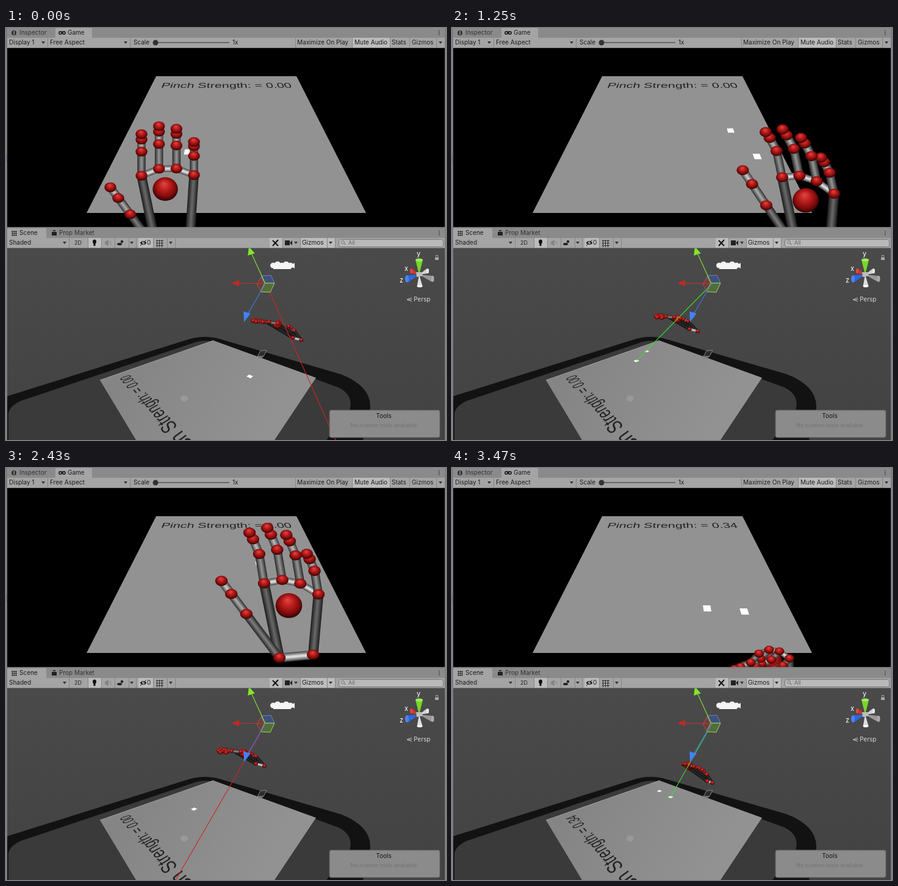
Animation, 721 px wide and 675 px high, one loop 3550 ms. Source, as an HTML page with a canvas:

```html
<!DOCTYPE html>
<html lang="en">
<head>
<meta charset="utf-8">
<title>Hand tracking editor</title>
<style>
html, body { margin: 0; width: 100%; height: 100%; overflow: hidden; background: #7d7d7d; }
canvas { display: block; }
</style>
</head>
<body>
<canvas id="stage" width="721" height="675"></canvas>
<script>
const ctx = document.getElementById('stage').getContext('2d');
const LOOP = 3550, STEPS = 45;
const mix = (a, b, t) => a.map((v, i) => v + (b[i] - v) * t);
const add = (a, b, k = 1) => [a[0] + b[0] * k, a[1] + b[1] * k];

// Drawing helpers
function rect(x, y, w, h, c) { ctx.fillStyle = c; ctx.fillRect(x, y, w, h); }
function poly(pts, fill, stroke) {
  ctx.beginPath();
  pts.forEach(p => ctx.lineTo(p[0], p[1]));
  ctx.closePath();
  if (fill) { ctx.fillStyle = fill; ctx.fill(); }
  if (stroke) { ctx.strokeStyle = stroke; ctx.lineWidth = 1; ctx.stroke(); }
}
function line(a, b, c, w = 1) {
  ctx.strokeStyle = c; ctx.lineWidth = w;
  ctx.beginPath(); ctx.moveTo(a[0], a[1]); ctx.lineTo(b[0], b[1]); ctx.stroke();
}
function oval(x, y, rx, ry, c) {
  ctx.fillStyle = c;
  ctx.beginPath(); ctx.ellipse(x, y, rx, ry, 0, 0, 7); ctx.fill();
}
function box(x, y, w, h, fill, stroke) {
  ctx.fillStyle = fill; ctx.strokeStyle = stroke; ctx.lineWidth = 1;
  ctx.beginPath(); ctx.roundRect(x, y, w, h, 3); ctx.fill(); ctx.stroke();
}
function label(s, x, y, c = '#1c1c1c', size = 10, align = 'left') {
  ctx.font = size + 'px Inter, sans-serif';
  ctx.textAlign = align; ctx.textBaseline = 'middle';
  ctx.fillStyle = c; ctx.fillText(s, x, y);
}
function caret(x, y) { poly([[x - 3, y - 2], [x + 3, y - 2], [x, y + 2]], '#333'); }
function view(x, y, w, h, draw) {
  ctx.save(); ctx.beginPath(); ctx.rect(x, y, w, h); ctx.clip();
  draw(); ctx.restore();
}

// Perspective map from the unit square to four corners, clockwise from top left
function quadMap([p0, p1, p2, p3]) {
  const [ax, ay] = add(p1, p2, -1), [bx, by] = add(p3, p2, -1);
  const [sx, sy] = add(add(p0, p1, -1), add(p2, p3, -1));
  const det = ax * by - bx * ay;
  const g = (sx * by - bx * sy) / det, h = (ax * sy - sx * ay) / det;
  return (u, v) => [0, 1].map(i =>
    ((p1[i] * (1 + g) - p0[i]) * u + (p3[i] * (1 + h) - p0[i]) * v + p0[i]) / (1 + g * u + h * v));
}
const GAME = [[246, 79], [476, 79], [590, 303], [132, 303]];
const toGame = quadMap(GAME);
const toScene = quadMap([[300, 820], [154, 577], [340, 512], [508, 573]]);
function fromGame([x, y]) {
  const w = 230 + (y - 79) * 228 / 224;
  return [(x - 361) / w + .5, (1 / 230 - 1 / w) / (1 / 230 - 1 / 458)];
}
function boardText(s, map) {
  const em = .0873 / 100, ev = .09 / 100, d = .002, v = .13;
  ctx.font = '100px "Liberation Sans", Arial, sans-serif';
  ctx.textAlign = 'center'; ctx.textBaseline = 'alphabetic'; ctx.fillStyle = '#222';
  let u = .068;
  for (const ch of s) {
    const w = ctx.measureText(ch).width * em, m = u + w / 2, p = map(m, v);
    const across = add(map(m + d, v), p, -1), down = add(map(m, v + d), p, -1);
    ctx.save();
    ctx.transform(across[0] / d * em, across[1] / d * em, down[0] / d * ev, down[1] / d * ev, ...p);
    ctx.fillText(ch, 0, 30);
    ctx.restore();
    u += w;
  }
}
function cursor([u, v], map) {
  const r = .016;
  poly([map(u - r, v - r), map(u + r, v - r), map(u + r, v + r), map(u - r, v + r)], '#fff');
}

// Key poses: index knuckle, span to the little finger, finger reach, thumb tip, pointer hit, second cursor
const KEYS = [
  { at: 0, knuckle: [222, 242], span: [86, -1], reach: [0, -68], thumb: [171, 261], hit: [132, 167], dot: [298, 203] },
  { at: 6, knuckle: [112, 248], span: [106, -9], reach: [8, -72], thumb: [50, 274], hit: [-10, 231], dot: [254, 180] },
  { at: 12, knuckle: [579, 236], span: [84, 31], reach: [-25, -74], thumb: [513, 217], hit: [492, 157], dot: [523, 206] },
  { at: 20, knuckle: [503, 253], span: [86, 23], reach: [-29, -74], thumb: [440, 249], hit: [421, 179], dot: [477, 215] },
  { at: 31, knuckle: [423, 189], span: [89, 18], reach: [-24, -83], thumb: [353, 185], hit: [301, 91], dot: [414, 156] },
  { at: 38, knuckle: [477, 230], span: [94, 19], reach: [-26, -83], thumb: [410, 222], hit: [368, 131], dot: [446, 178] },
  { at: 44, knuckle: [503, 304], span: [50, 8], reach: [-40, 25], thumb: [470, 345], hit: [418, 230], dot: [479, 235] }
];
function poseAt(step) {
  const k = Math.max(1, KEYS.findIndex(p => p.at >= step)), a = KEYS[k - 1], b = KEYS[k];
  const t = (step - a.at) / (b.at - a.at), ease = t * t * (3 - 2 * t), pose = {};
  for (const key in a) if (key !== 'at') pose[key] = mix(a[key], b[key], ease);
  return pose;
}
// Knuckles sit on an arc; fingers bend sideways towards their tips
function buildHand({ knuckle, span, reach, thumb }) {
  const size = Math.max(17, .24 * Math.hypot(...span));
  const fingers = [0, 1, 2, 3].map(f => {
    const s = f / 3, len = 1 + .22 * s - .42 * s * s;
    const root = add(add(knuckle, span, s), [0, -2.4 * size * s * (1 - s)]);
    return [0, .58, .87, 1].map(t => add(root, [reach[0] * len * t * t, reach[1] * len * t]));
  });
  const wrist = add(knuckle, [25, 122]);
  return {
    size, fingers,
    thumb: [0, .17, .43].map(t => mix(thumb, wrist, t)),
    wrist: [wrist, add(wrist, [span[0] * .62, -5])],
    palm: add(add(knuckle, span, .5), [-4, .33 * Math.abs(reach[1])])
  };
}
// The same hand as the scene camera sees it: small, from the side
function shrink({ fingers, thumb, wrist, palm }) {
  const base = [509 - .245 * palm[0] + .15 * (palm[1] - 267), 499 - .043 * palm[0] + .25 * (palm[1] - 272)];
  const p = q => {
    const [x, y] = add(q, palm, -1);
    return add(base, [.36 * y - .22 * x, .15 * y + .001 * y * y - .04 * x]);
  };
  return { size: 7.4, fingers: fingers.map(f => f.map(p)), thumb: thumb.map(p), wrist: wrist.map(p), palm: base };
}

function ball([x, y], rx, ry) {
  ctx.save();
  ctx.translate(x, y); ctx.scale(1, ry / rx);
  const g = ctx.createRadialGradient(-rx * .1, -rx * .45, rx * .05, 0, -rx * .1, rx * 1.1);
  g.addColorStop(0, '#dc4440'); g.addColorStop(.4, '#b81b1b');
  g.addColorStop(.75, '#7d0b0b'); g.addColorStop(1, '#2c0303');
  oval(0, 0, rx, rx, g);
  ctx.restore();
}
function bone(a, b, w, tone) {
  for (let i = 0; i < 5; i++) {
    const c = Math.min(255, tone * (.4 + .17 * i));
    line(a, b, `rgb(${c},${c},${c})`, w * (1 - i * .2));
  }
}
function drawHand({ size, fingers, thumb, wrist, palm }, armTone) {
  const w = size * .66, r = size * .47;
  const joint = p => ball(p, r, r * .82);
  bone(fingers[0][0], wrist[0], w * 1.15, armTone);
  bone(fingers[3][0], wrist[1], w * 1.15, armTone);
  bone(thumb[2], wrist[0], w, armTone * 1.2);
  bone(wrist[0], wrist[1], w, 205);
  ball(palm, size, size * .94);
  wrist.forEach(joint);
  for (let f = 0; f < 3; f++) bone(fingers[f][0], fingers[f + 1][0], w * .8, 205);
  for (const f of [...fingers].reverse()) {
    for (let j = 0; j < 3; j++) bone(f[j], f[j + 1], w, 130 + 35 * j);
    f.forEach(joint);
  }
  bone(thumb[2], thumb[1], w, 150);
  bone(thumb[1], thumb[0], w, 180);
  [...thumb].reverse().forEach(joint);
}

function drawBars() {
  rect(0, 0, 721, 675, '#7d7d7d');
  rect(0, 207, 1, 13, '#4a6a9c');
  for (const [y, x, w] of [[0, 81, 60], [328, 2, 64]]) {
    rect(2, y, 717, 16, '#8a8a8a');
    rect(x, y, w, 16, '#a4a4a4');
    rect(2, y + 16, 717, 17, '#a4a4a4');
    rect(2, y + 32, 717, 1, '#747474');
    for (let i = 0; i < 3; i++) rect(709, y + 4 + i * 3, 1.5, 1.5, '#333');
  }
  // A toolbar cell: optional lit face, with a divider on its right
  const cell = (x, w, y, lit) => {
    if (lit) rect(x, y, w, 16, '#bcbcbc');
    rect(x + w, y, 1, 16, '#858585');
  };
  oval(13, 8, 4, 4, '#333'); rect(12.5, 5, 1.2, 6, '#aaa');
  label('Inspector', 22, 8, '#333');
  rect(89, 5.5, 6, 4, '#222');
  for (const x of [89, 95]) { oval(x, 8, 3, 3, '#222'); oval(x, 8, 1.2, 1.2, '#aaa'); }
  label('Game', 101, 8);
  cell(2, 66, 16); label('Display 1', 5, 24); caret(61, 24);
  cell(69, 134, 16); label('Free Aspect', 72, 24); caret(196, 24);
  cell(204, 270, 16); label('Scale', 209, 24);
  rect(245, 23, 121, 1.5, '#555'); oval(245, 24, 4.5, 4.5, '#333');
  label('1x', 371, 24);
  cell(475, 92, 16); label('Maximize On Play', 477, 24);
  cell(568, 61, 16, true); label('Mute Audio', 571, 24);
  cell(630, 31, 16); label('Stats', 632, 24);
  cell(662, 43, 16); label('Gizmos', 665, 24); caret(712, 24);

  const mesh = (x, y, n) => {
    for (let i = 0; i < 3; i++) { rect(x + 1 + i * n, y, 1, n * 3, '#333'); rect(x, y + 1 + i * n, n * 3, 1, '#333'); }
  };
  mesh(9, 332, 3); label('Scene', 22, 336);
  rect(75, 334, 8, 6, '#222'); rect(77, 331, 4, 2, '#333'); label('Prop Market', 87, 336, '#333');
  cell(2, 101, 344); label('Shaded', 5, 352); caret(96, 352);
  cell(107, 27, 344); label('2D', 118, 352, '#222', 9, 'center');
  cell(135, 21, 344, true); oval(145, 350, 3, 3.5, '#111'); rect(143.5, 353, 3, 4, '#111');
  cell(157, 21, 344); poly([[162, 350], [168, 347], [168, 357], [162, 354]], '#858585'); line([170, 349], [172, 355], '#858585');
  cell(179, 22, 344); oval(186, 354, 4, 2, '#222'); oval(190, 350, 2.2, 2.2, '#222');
  cell(202, 11, 344); caret(206, 352);
  cell(217, 24, 344, true); oval(225, 352, 5, 3, '#222'); oval(225, 352, 2, 2, '#ccc');
  line([220, 357], [230, 347], '#222'); label('0', 231, 352);
  cell(242, 22, 344); mesh(246, 347, 4);
  cell(265, 12, 344); caret(270, 352);
  cell(432, 21, 344, true); line([437, 348], [446, 357], '#111', 2); line([446, 347], [437, 357], '#111', 2);
  cell(454, 28, 344); rect(457, 348, 8, 8, '#222'); poly([[465, 352], [469, 348], [469, 356]], '#222'); caret(475, 352);
  cell(483, 43, 344, true); label('Gizmos', 485, 352);
  cell(527, 12, 344, true); caret(532, 352);
  box(545.5, 346.5, 171, 12, '#b9b9b9', '#777');
  ctx.beginPath(); ctx.arc(552, 351, 2.5, 0, 7); ctx.stroke(); line([554, 353], [557, 355], '#666');
  label('All', 561, 352.5, '#666', 9);
}

function cone(base, tip, w, c) {
  const d = add(tip, base, -1), k = w / Math.hypot(...d), n = [-d[1] * k, d[0] * k];
  poly([tip, add(base, n), add(base, n, -1)], c);
}
function drawTray() {
  const bg = ctx.createLinearGradient(0, 361, 0, 675);
  bg.addColorStop(0, '#4a4a4a'); bg.addColorStop(1, '#424242');
  rect(2, 361, 717, 314, bg);
  ctx.fillStyle = '#121212';
  ctx.fill(new Path2D('M0 604L296 511Q320 503 345 508L548 567Q598 586 597 622L585 675H0Z'));
  ctx.fillStyle = '#3a3a3a';
  ctx.fill(new Path2D('M4 675V632Q5 620 24 611L304 517Q322 510 340 514L545 589Q572 602 562 630L525 675Z'));
  const g = ctx.createLinearGradient(200, 560, 420, 675);
  g.addColorStop(0, '#858585'); g.addColorStop(1, '#929292');
  poly([[154, 577], [340, 512], [508, 573], [440, 675], [213, 675]], g);
  line([154, 577], [340, 512], '#a0a0a0');
  oval(292, 607, 6, 5, '#999');
  poly([[412, 538], [417, 529], [427, 528], [422, 538]], '#2c2c2c', '#888');
  poly([[412, 538], [422, 538], [418, 542]], '#777');
}
function drawMoveTool() {
  const o = [425, 419];
  poly([[411, 420], [418, 408], [424, 419], [418, 432]], 'rgba(150,50,45,.45)', '#b94a40');
  poly([[418, 406], [434, 405], [440, 418], [424, 418]], 'rgba(60,85,150,.65)', '#6688c8');
  poly([[424, 418], [440, 418], [433, 433], [417, 432]], 'rgba(85,120,55,.75)', '#9bd65a');
  line(o, [403, 371], '#7fdc2c', 1.2); cone([402, 371], [398, 358], 6, '#82e52b');
  line(o, [381, 418], '#c7372b'); cone([382, 418], [369, 418], 5, '#c4281f');
  line(o, [397, 467], '#3f76e8', 1.2); cone([395, 466], [390, 482], 6, '#4381f5');
  for (let i = 0; i < 5; i++) oval(438 + i * 7, 389 - i % 2 * 2, 5, 4.5, '#f4f4f4');
  rect(438, 388, 29, 7, '#f4f4f4');
  poly([[465, 389], [473, 385], [473, 394]], '#f4f4f4');
}
function drawCompass() {
  const c = [677, 404];
  const arm = (x, y, w, color, face, name, dx, dy) => {
    cone([x, y], c, w, color);
    const flat = Math.abs(x - c[0]) < 3;
    oval(x, y, flat ? w : w / 2, flat ? w / 2.5 : w, face);
    if (name) label(name, x + dx, y + dy, '#fff', 11, 'center');
  };
  arm(691, 398, 4, '#d4d4d4', '#e8e8e8');
  arm(699, 411, 5, '#989898', '#aaa');
  arm(664, 398, 4, '#d8342a', '#e4463c', 'x', -8, -3);
  arm(657, 411, 6, '#2f66d8', '#4c82ee', 'z', -9, 3);
  arm(677, 380, 6, '#77d62a', '#9cee5c', 'y', -1, -9);
  arm(678, 423, 4.5, '#ddd', '#fff');
  poly([[672, 400], [681, 400], [683, 406], [673, 408]], '#bdbdbd');
  label('Persp', 668, 445, '#d6d6d6');
  for (const d of [-3, 0, 3]) line([657, 445], [665, 445 + d], '#c8c8c8', .9);
  rect(703, 376, 6, 4, '#aaa'); ctx.strokeStyle = '#aaa'; ctx.strokeRect(704.5, 372.5, 3, 4);
}

function frame(now) {
  const step = Math.min(STEPS - 1, Math.floor((now % LOOP + 20) * STEPS / LOOP));
  const pose = poseAt(step), hand = buildHand(pose);
  const hit = fromGame(pose.hit), dot = fromGame(pose.dot);
  const lands = hit[0] > 0 && hit[0] < 1 && hit[1] > .15;
  const text = 'Pinch Strength: = ' + (Math.max(0, step - 42) * .17).toFixed(2);
  const board = map => {
    boardText(text, map);
    cursor(dot, map);
    if (lands) cursor(hit, map);
  };
  drawBars();
  view(2, 33, 717, 293, () => {
    rect(2, 33, 717, 293, '#000');
    poly(GAME, '#929292');
    board(toGame);
    drawHand(hand, 92);
  });
  view(2, 361, 717, 314, () => {
    drawTray();
    board(toScene);
    drawHand(shrink(hand), 40);
    const from = [426, 419], end = toScene(...hit), ray = add(end, from, -1);
    line(from, lands ? end : add(from, ray, 271 / ray[1]), lands ? '#36e12c' : '#d02424', 1.1);
    drawMoveTool();
    drawCompass();
    box(530, 626, 181, 45, '#8b8b8b', '#5a5a5a');
    label('Tools', 619, 636, '#161616', 10, 'center');
    label('No custom tools available.', 620, 651, '#737373', 9, 'center');
  });
}
const start = performance.now();
function tick() {
  frame(performance.now() - start);
  requestAnimationFrame(tick);
}
tick();
</script>
</body>
</html>
```
